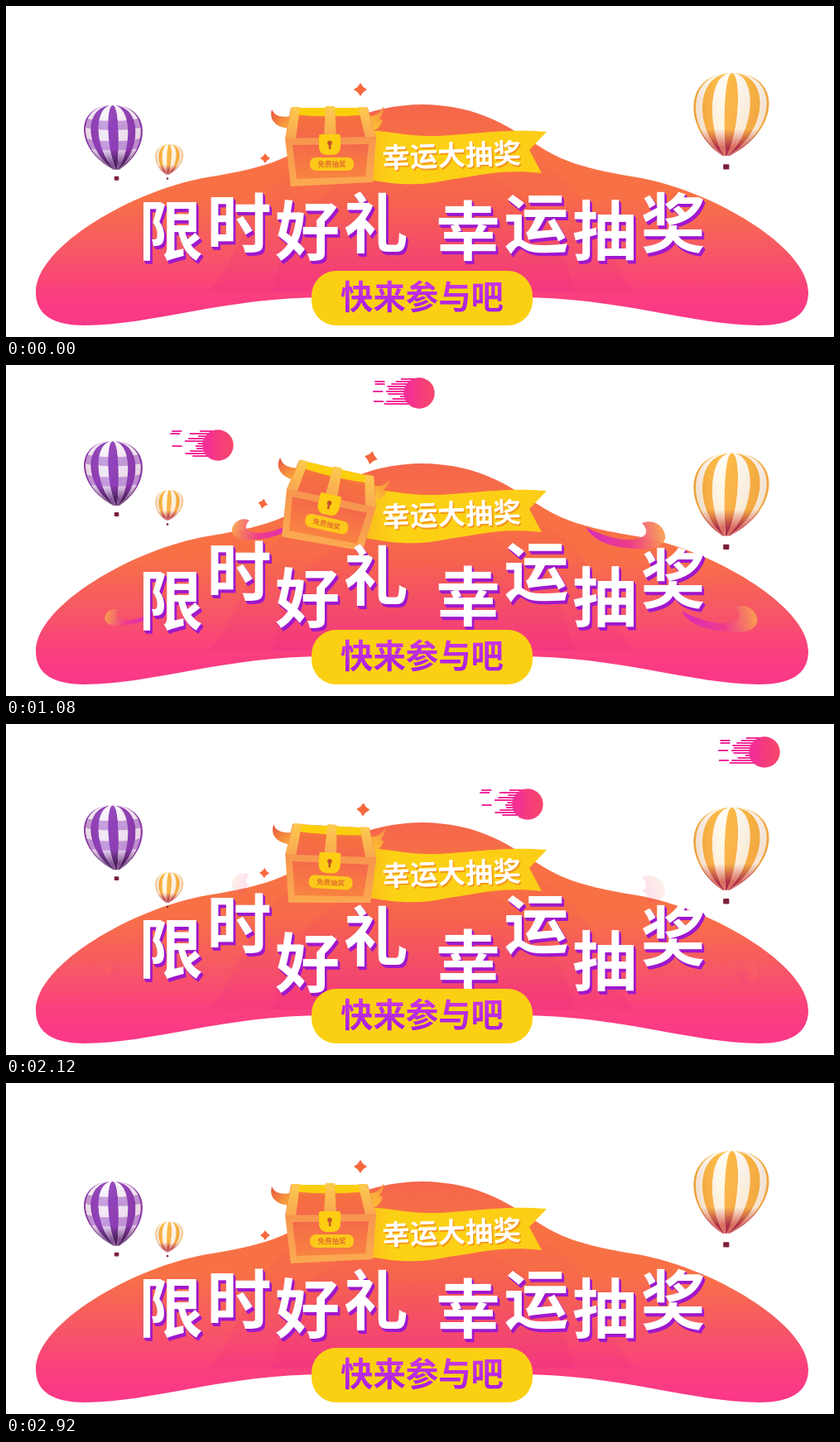
Recreate the animation shown at these times as an HTML page with a canvas. Size 1000x400 px, loop 2960 ms.

```html
<!DOCTYPE html>
<html lang="zh-CN">
<head>
<meta charset="utf-8">
<title>幸运大抽奖</title>
<style>
html, body { margin: 0; width: 100%; height: 100%; overflow: hidden; background: #fff; }
canvas { display: block; width: 1000px; height: 400px; }
</style>
</head>
<body>
<canvas id="stage" width="1000" height="400"></canvas>
<script>
const ctx = document.getElementById('stage').getContext('2d');
const LOOP = 2960, STEP = 40;
const FONT = '"Noto Sans CJK SC", "Noto Sans CJK", "Noto Sans CJK JP", sans-serif';

// Linear interpolation through time/value pairs.
function at(t, k) {
  if (t <= k[0]) return k[1];
  for (let i = 2; i < k.length; i += 2) {
    if (t <= k[i]) {
      return k[i - 1] + (k[i + 1] - k[i - 1]) * (t - k[i - 2]) / (k[i] - k[i - 2]);
    }
  }
  return k[k.length - 1];
}
// Triangle waves: one per loop, two per loop, and only the first of two.
const sway = (t, a) => a * (1 - Math.abs(1 - 2 * t / LOOP));
const bob = (t, a) => sway(t * 2 % LOOP, a);
const once = (t, a) => t < LOOP / 2 ? bob(t, a) : 0;

function grad(x0, y0, x1, y1, ...stops) {
  const g = ctx.createLinearGradient(x0, y0, x1, y1);
  for (let i = 0; i < stops.length; i += 2) g.addColorStop(stops[i], stops[i + 1]);
  return g;
}
function shape(fill, d) {
  ctx.fillStyle = fill;
  ctx.fill(new Path2D(d));
}
function pill(fill, x, y, w, h, r) {
  ctx.fillStyle = fill;
  ctx.beginPath();
  ctx.roundRect(x, y, w, h, r);
  ctx.fill();
}
function disc(fill, x, y, r) {
  ctx.fillStyle = fill;
  ctx.beginPath();
  ctx.arc(x, y, r, 0, 7);
  ctx.fill();
}
// Text centred on its em box.
function label(str, x, y, size, fill, weight = 700) {
  ctx.font = `${weight} ${size}px ${FONT}`;
  ctx.textAlign = 'center';
  ctx.fillStyle = fill;
  ctx.fillText(str, x, y + size * 0.38);
}

function hill() {
  const fill = grad(0, 119, 0, 386, 0, '#f5664b', 0.2, '#f87145', 0.42, '#f87146',
    0.64, '#f65a62', 0.85, '#fa3f7e', 1, '#fb3789');
  const half = 'M500 119C575 119 612 150 648 172C676 190 712 199 762 207' +
    'C850 222 969 290 969 346C969 375 945 386 910 386C830 386 740 352 620 352H500Z';
  ctx.save();
  shape(fill, half);
  ctx.translate(1005, 0);
  ctx.scale(-1, 1);
  shape(fill, half);
  ctx.restore();
  const veil = grad(0, 165, 0, 345, 0, 'rgba(240,70,80,.06)', 1, 'rgba(236,40,130,.22)');
  shape(veil, 'M245 345C290 300 290 195 400 180H610C715 195 715 300 760 345Z');
  shape(veil, 'M322 345C335 250 400 190 502 190C604 190 670 250 685 345Z');
}

// A curl with its head at x, y and a tail of the given length.
function leaf(x, y, size, dir, len, alpha) {
  ctx.save();
  ctx.globalAlpha = alpha;
  ctx.translate(x, y);
  ctx.scale(dir * size, size);
  shape(grad(-Math.max(len, 30), 8, 14, -10, 0, '#d428c4', 0.55, '#ee3a8c', 1, '#f9a04e'),
    `M${-len} ${2 - len * 0.15}C${-len * 0.6} 6 ${-len * 0.3} 8 -12 2` +
    'C-4 -2 -6 -9 -12 -15C4 -22 18 -8 16 4C12 17 -4 18 ' +
    `${-len * 0.4} 15C${-len * 0.7} 12 ${-len * 0.9} 4 ${-len} ${2 - len * 0.15}Z`);
  ctx.restore();
}
function leaves(t) {
  const len = at(t, [1080, 80, 1520, 17, 2200, 6]);
  const dy = at(t, [1080, 0, 1840, -6]);
  const fade = start => at(t, [start, 0, start + 350, 0.95, 1900, 0.95, 2160, 0]);
  leaf(780, 206 + dy, 1, 1, len, fade(700));
  leaf(285, 199 + dy, 0.75, -1, len, fade(700));
  leaf(892, 307 + dy, 0.95, 1, len, fade(560));
  leaf(129, 305 + dy, 0.6, -1, len, fade(560));
}

const ORANGE = ['#fcb739', '#fbae3c', '#a81f3a', '#fffdf6', '#fff3dc', '#d9614f'];
const PURPLE = ['#8c3cba', '#8430b0', '#3d1050', '#fcf8fe', '#ecdff5', '#7d4495'];

function balloon(cx, cy, r, neck, pal, checked) {
  const n = 9, end = r * 1.22;
  const mid = i => Math.sin((i / n - 0.5) * Math.PI) * r;
  const side = (p, x, back) => back
    ? p.bezierCurveTo(x * 1.33, r * 0.5, x * 1.33, -r, 0, -r)
    : p.bezierCurveTo(x * 1.33, -r, x * 1.33, r * 0.5, neck * r + x * 0.1, end);
  const gore = (a, b) => {
    const p = new Path2D();
    p.moveTo(0, -r);
    side(p, mid(a));
    p.lineTo(neck * r + mid(b) * 0.1, end);
    side(p, mid(b), true);
    return p;
  };
  ctx.save();
  ctx.translate(cx, cy);
  for (let i = 0; i < n; i++) {
    const c = i % 2 * 3;
    ctx.fillStyle = grad(0, -r, 0, end, 0, pal[c], 0.68, pal[c + 1], 0.9, pal[c + 2]);
    ctx.fill(gore(i, i + 1));
  }
  const all = gore(0, n);
  if (checked) {
    ctx.save();
    ctx.clip(all);
    ctx.strokeStyle = 'rgba(133,50,184,.45)';
    ctx.lineWidth = r * 0.32;
    for (const y of [-0.5, 0.2]) {
      ctx.beginPath();
      ctx.ellipse(0, y * r, r * 1.1, r * 0.2, 0, 0, Math.PI);
      ctx.stroke();
    }
    ctx.restore();
  }
  ctx.fillStyle = grad(-r, 0, r, 0, 0, 'rgba(150,60,40,.14)', 0.35, 'rgba(255,255,255,.08)',
    1, 'rgba(150,60,60,.12)');
  ctx.fill(all);
  pill('#7c2038', neck * r - r * 0.08, r * 1.45, r * 0.16, r * 0.14, 1);
  ctx.restore();
}

function comet(x, y, seed) {
  const rnd = () => (seed = seed * 16807 % 2147483647) / 2147483647;
  ctx.save();
  ctx.translate(Math.round(x), y);
  disc(grad(-19, 0, 19, 0, 0, '#f52f93', 1, '#f5476a'), 0, 0, 18.7);
  ctx.fillStyle = grad(-58, 0, 0, 0, 0, '#ee2c9f', 1, '#f52f93');
  for (let dy = -18; dy < 13; dy += 3) {
    const tail = 22 + 22 * rnd();
    ctx.fillRect(-tail, dy, tail - 6, 2);
    if (rnd() < 0.4) ctx.fillRect(-58 + 6 * rnd(), dy, 12, 2);
  }
  ctx.restore();
}

function flag() {
  shape(grad(436, 0, 655, 0, 0, '#f9bf1c', 0.15, '#fcd214', 1, '#fccd16'),
    'M425 150C460 149 480 158 520 157C570 155 600 148 653 152L632 174L647 202' +
    'C600 196 565 206 535 210C500 218 470 217 425 207Z');
  ctx.save();
  ctx.translate(538, 180);
  ctx.rotate(-0.035);
  label('幸运大抽奖', 1.5, 2, 33.5, 'rgba(238,120,30,.65)');
  label('幸运大抽奖', 0, 0, 33.5, '#fff');
  ctx.restore();
}

function spark(x, y, r) {
  const q = r * 0.42;
  shape('#f8683f', `M${x} ${y - r}L${x + q} ${y - q}L${x + r} ${y}L${x + q} ${y + q}` +
    `L${x} ${y + r}L${x - q} ${y + q}L${x - r} ${y}L${x - q} ${y - q}Z`);
}

function chest(t) {
  const turn = at(t, [0, 0, 900, 14.5, 2450, 0]);
  ctx.save();
  ctx.translate(385, 164);
  ctx.rotate(turn * Math.PI / 180);
  ctx.translate(-385, -164);
  spark(428, 101, 8);
  spark(313, 184, 6);

  // horns
  shape(grad(320, 126, 345, 146, 0, '#ea5440', 1, '#fab33c'),
    'M345 148C328 148 317 139 321 125C325 133 331 135 345 133Z');
  shape(grad(440, 146, 457, 122, 0, '#fbc132', 1, '#f58a45'),
    'M436 133C447 134 452 129 456 121C456 130 453 133 451 136L455 138C452 146 448 151 438 151Z');

  // lid
  shape(grad(0, 122, 0, 160, 0, '#f88a3a', 0.4, '#f5703f', 1, '#f4694a'),
    'M344 123H437L447 159L337 161Z');
  shape('#fbcf0c', 'M350 123H432L435 131C410 134 370 134 347 131Z');
  const strap = grad(0, 122, 0, 160, 0, '#fcca4e', 1, '#f9a752');
  shape(strap, 'M345 122H355L350 161H337Z');
  shape(strap, 'M386 121H397L399 160H384Z');
  shape(strap, 'M425 122H436L447 159H434Z');

  // body
  shape(grad(0, 158, 0, 218, 0, '#f7954f', 1, '#fbaa50'), 'M337 160L447 158L443 213L344 218Z');
  shape(grad(0, 167, 0, 210, 0, '#f4694a', 1, '#f98540'), 'M346 168L438 167L434 206L351 209Z');

  // lock and plate
  pill('#fccd12', 378, 155, 26, 25, [2, 2, 9, 9]);
  disc('#c6552c', 391, 165.5, 2.8);
  ctx.fillRect(389.8, 166, 2.6, 7);
  pill('#fcc81a', 367, 183, 53, 16, 7);
  label('免费抽奖', 393.5, 191, 8.5, '#e4722e');
  ctx.restore();
}

const TITLE = [['限', once, 25], ['时', bob, -25], ['好', bob, 20], ['礼', sway, -11],
  ['幸', bob, 16], ['运', bob, -25], ['抽', bob, 18], ['奖', bob, -7]];

function title(t) {
  TITLE.forEach(([ch, move, lift], i) => {
    const x = 199 + 82.5 * i + (i > 3 ? 29 : 0);
    const y = (i % 2 ? 262.5 : 271) + move(t, lift);
    for (let d = 4; d > 0; d--) label(ch, x + d * 0.7, y + d, 78, '#a018cc', 900);
    label(ch, x, y, 78, '#fff', 900);
  });
}

function button() {
  pill('#fbd012', 369, 320, 267, 66, 30);
  label('快来参与吧', 502.5, 351, 39.4, grad(0, 334, 0, 369, 0, '#c935e2', 1, '#a81fe0'), 900);
}

function draw(t) {
  ctx.fillStyle = '#fff';
  ctx.fillRect(0, 0, 1000, 400);
  hill();
  leaves(t);
  balloon(129, 155 + sway(t, -38), 35, 0.13, PURPLE, true);
  balloon(197.5, 183.5 + at(t, [0, 0, 900, -22, 2000, 14, LOOP, 0]), 16.5, -0.15, ORANGE);
  balloon(877, 126 + sway(t, 35), 45, -0.16, ORANGE);
  comet(at(t, [40, -20, 720, 373, 1480, 640, 2640, 1140]), 34, 7);
  comet(at(t, [100, -20, 720, 150, 1840, 479, 2920, 1060]), 97, 23);
  flag();
  chest(t);
  title(t);
  button();
}

function tick() {
  const t = performance.now() % LOOP;
  draw(Math.floor(t / STEP) * STEP);
  requestAnimationFrame(tick);
}
tick();
</script>
</body>
</html>
```
